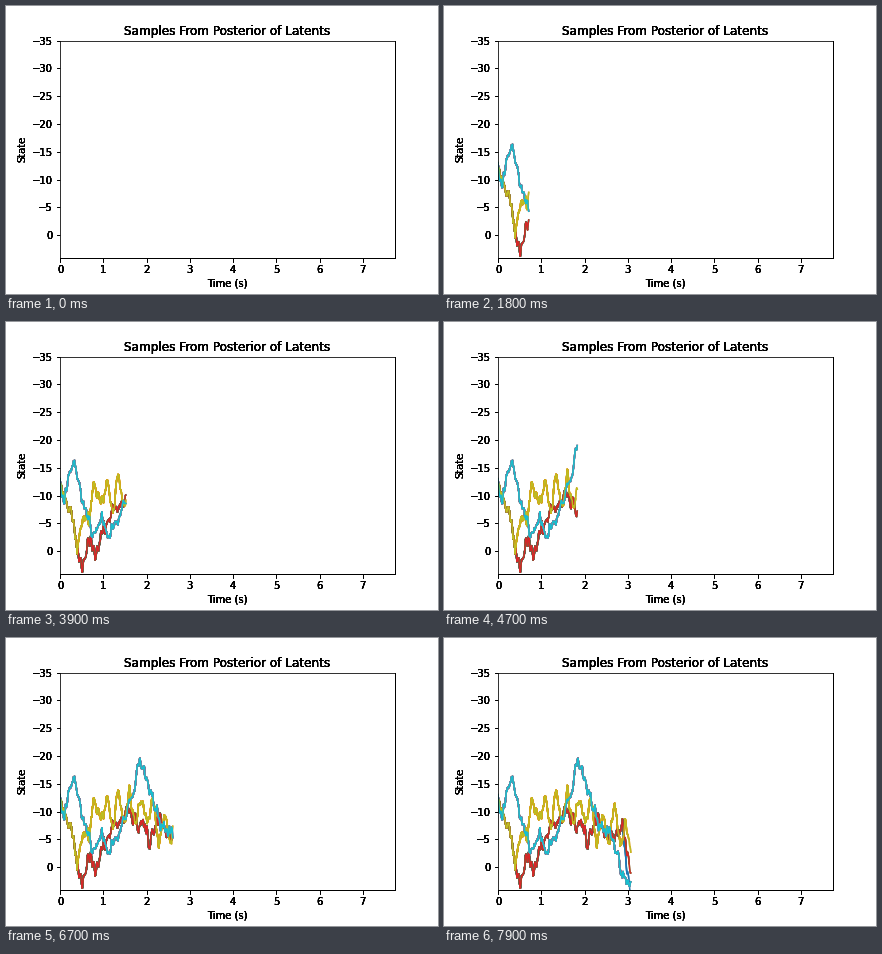
Recreate the animation shown at these times as a matplotlib script. Size 432 by 288 pixels, loop 8 s.

```python
import numpy as np
import matplotlib.pyplot as plt
from matplotlib.animation import FuncAnimation

plt.rcParams["font.family"] = "DejaVu Sans"

FRAMES = 80
STEP = 3             # data points per frame
DT = 7.74 / 200 / STEP
PASSES = 8           # repeated strokes harden the line edges
LAYERS = 6           # stacked axes harden the lettering

rng = np.random.default_rng(5)
time = np.arange(FRAMES * STEP) * DT


def trend(*keys):
    return np.interp(time, *zip(*keys))


def jitter(size=0.75):
    """Short-range noise: a moving average of white noise."""
    white = rng.normal(0, size * np.sqrt(3), len(time) + 2)
    return np.convolve(white, np.ones(3) / 3, "valid")


high = jitter() + trend(
    (0, -12), (0.08, -9), (0.31, -16), (0.55, -7.5), (0.79, -3.5),
    (0.97, -5.5), (1.1, -2), (1.3, -5), (1.55, -10), (1.7, -14),
    (1.83, -20), (2.1, -13), (2.3, -8.5), (2.7, -4.7), (2.95, 3.2), (3.1, 3))

# The middle path swings regularly once it has climbed back
swing = 2.2 * np.cos(2 * np.pi * (time - 0.8) / 0.27)
mid = jitter() - np.where(time > 0.65, swing, 0) + trend(
    (0, -12), (0.08, -9.5), (0.25, -8), (0.4, -0.5), (0.5, -5), (0.65, -6),
    (0.75, -10), (2.15, -10.5), (2.3, -6.3), (2.7, -8.5), (3.1, -4))

low = jitter() + trend(
    (0.4, -0.5), (0.52, 4.6), (0.63, -2.5), (0.8, 0.5), (1, -3), (1.15, -6),
    (1.6, -10.5), (1.8, -8), (1.95, -8.5), (2.07, -4.3), (2.25, -9),
    (2.6, -4.2), (2.87, -7.5), (3.1, 1.5))
low = np.where(time < 0.4, mid, low)
branch = low + np.clip(30 * (time - 2.87), 0, 3.5)

# Ten samples that share their ancestors, in colour-cycle order
samples = [branch, mid, low, low, high, high, high, high, mid, high]

fig = plt.figure(figsize=(6, 4), dpi=72, facecolor="white")
fig.subplots_adjust(left=0.125, right=0.9, bottom=0.125, top=0.88)


def add_axes(layer):
    ax = fig.add_subplot(111, label=f"layer{layer}")
    ax.set_xlim(0, 7.74)
    ax.set_ylim(4.08, -35)
    ax.set_title("Samples From Posterior of Latents")
    ax.set_xlabel("Time (s)")
    ax.set_ylabel("State")
    return ax


ax = [add_axes(k) for k in range(LAYERS)][-1]
strokes = [(ax.plot([], [], color=f"C{c}", lw=1.5)[0], values, age)
           for age in reversed(range(PASSES))
           for c, values in enumerate(samples)]


def update(frame):
    for line, values, age in strokes:
        n = frame - age
        end = STEP * n + 2 if n > 0 else 0
        line.set_data(time[:end], values[:end])
    return [line for line, _, _ in strokes]


anim = FuncAnimation(fig, update, frames=FRAMES, interval=100,
                     init_func=lambda: update(0), repeat=True, repeat_delay=0)
plt.show()
```
